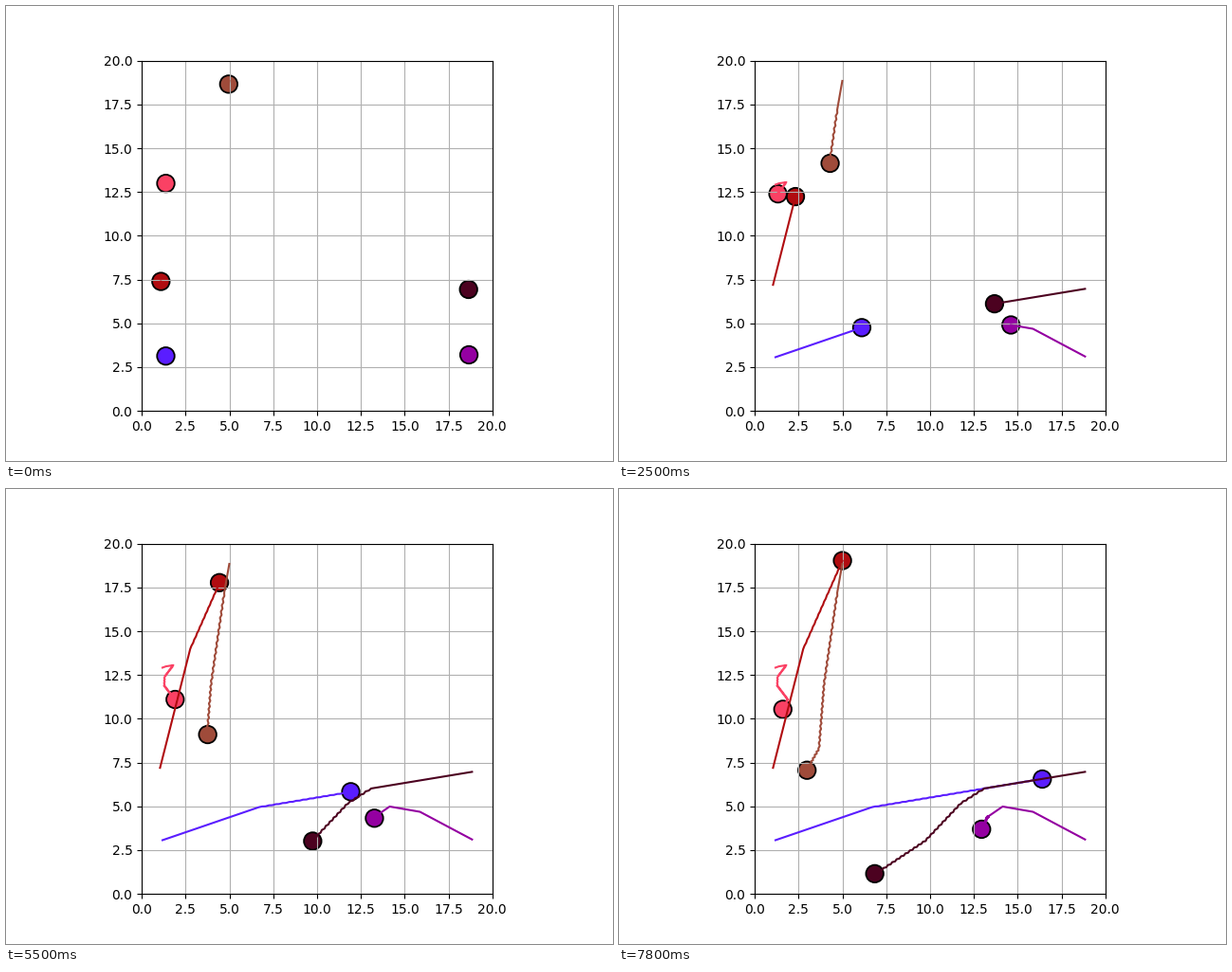
These frames come from a looping animation (640 px wide and 480 px high, 7900 ms). A matplotlib script:

```python
import matplotlib.pyplot as plt
import numpy as np
from matplotlib.animation import FuncAnimation

FRAMES, INTERVAL = 79, 100
RADIUS = 0.5

fig, ax = plt.subplots(figsize=(6.4, 4.8), dpi=100)
ax.set_aspect("equal")
ax.set_xlim(0, 20)
ax.set_ylim(0, 20)
ax.grid(True)


class Robot:
    """Drives straight legs between turns (step, x, y).

    From the step `dodge` on it sways sideways while it moves.
    """

    def __init__(self, color, turns, sway, dodge):
        t = np.arange(-1, FRAMES)
        step, x, y = np.array(turns).T
        pos = np.column_stack([np.interp(t, step, x), np.interp(t, step, y)])
        vel = np.gradient(pos, axis=0)
        normal = vel[:, ::-1] * (-1, 1)
        normal /= np.hypot(*vel.T)[:, None] + 1e-9
        side = sway * (t > dodge) * np.where(t % 2, 1, -1)
        self.path = pos + normal * side[:, None]
        self.body = ax.add_patch(
            plt.Circle(self.path[1], RADIUS, fc=color, ec="black", lw=1.3))
        self.trail, = ax.plot([], [], color=color, lw=1.5)

    def show(self, i):
        self.body.center = self.path[i + 1]
        self.trail.set_data(*self.path[:i + 2].T)
        return self.body, self.trail


robots = [
    Robot("#5a1dff", [(-1, 1.18, 3.07), (28, 6.67, 4.95), (78, 16.4, 6.57)],
          sway=0.012, dodge=28),
    Robot("#b00c10", [(-1, 1.04, 7.2), (34, 2.76, 13.98), (62, 5, 19.03)],
          sway=0.01, dodge=34),
    Robot("#fa4164", [(-1, 1.18, 12.92), (0, 1.37, 12.99), (9, 1.8, 13.06),
                      (25, 1.3, 12.4), (32, 1.28, 11.89), (55, 1.88, 11.1),
                      (70, 1.6, 10.54)],
          sway=0.02, dodge=9),
    Robot("#9f4b3a", [(-1, 4.99, 18.84), (8, 4.7, 17.19), (37, 3.95, 11.99),
                      (60, 3.66, 8.3), (70, 3.13, 7.37), (78, 3.01, 7.05)],
          sway=0.035, dodge=8),
    Robot("#4c0220", [(-1, 18.84, 6.97), (28, 13.08, 6.02), (37, 11.75, 5.17),
                      (55, 9.73, 3.04), (78, 6.86, 1.13)],
          sway=0.03, dodge=28),
    Robot("#9400a1", [(-1, 18.84, 3.11), (8, 17.24, 3.96), (17, 15.87, 4.69),
                      (28, 14.14, 4.99), (40, 13.34, 4.44), (55, 13.24, 4.34),
                      (78, 12.97, 3.68)],
          sway=0.035, dodge=40),
]


def update(i):
    return [artist for robot in robots for artist in robot.show(i)]


anim = FuncAnimation(fig, update, frames=FRAMES, interval=INTERVAL,
                     repeat=True, repeat_delay=0, blit=False)
plt.show()
```
